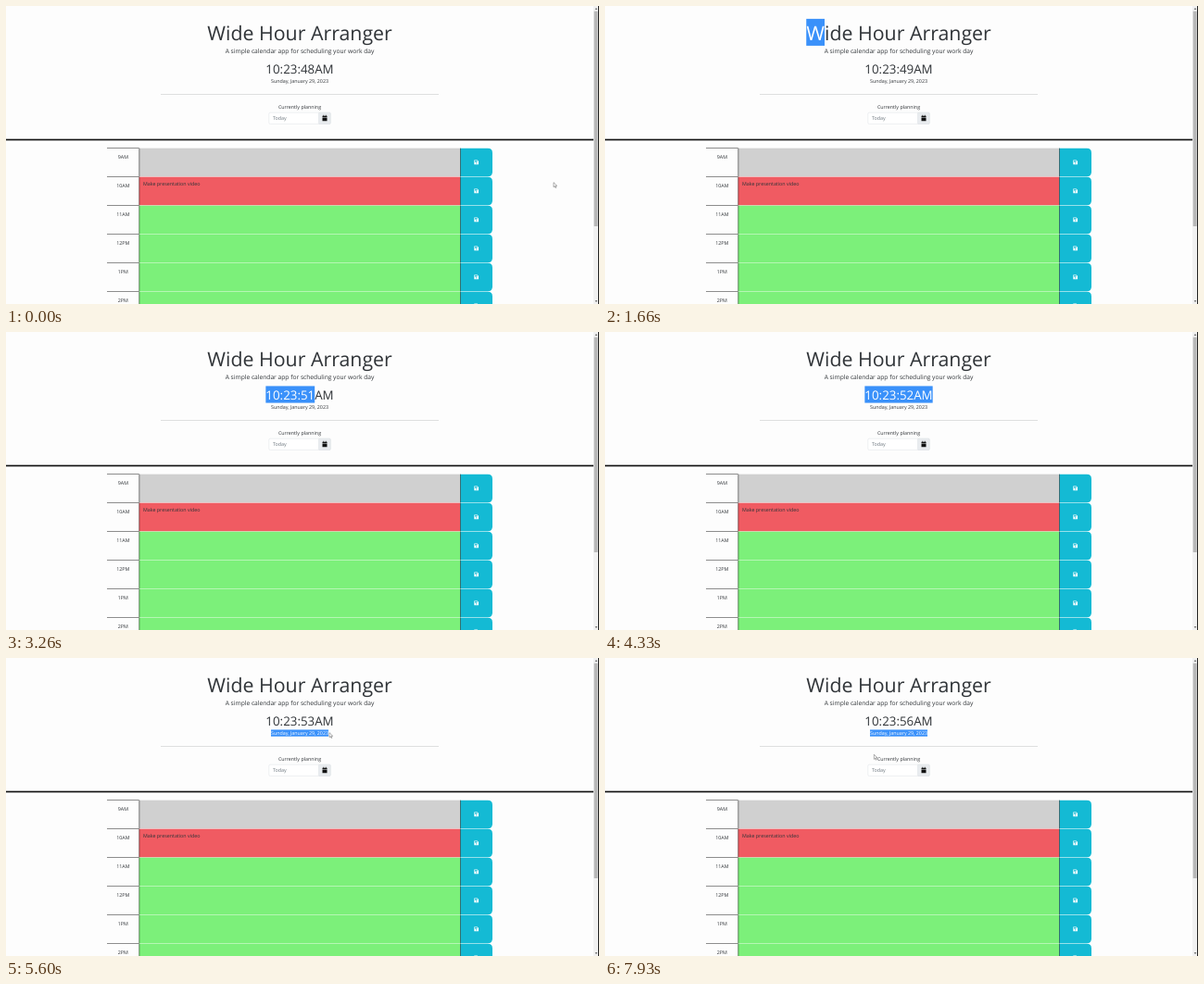
Write an HTML page that moves like this. It is 640x322 px and loops after 8000 ms.

```html
<!DOCTYPE html>
<html lang="en">
<head>
<meta charset="utf-8">
<title>Hour planner</title>
<style>
  html, body { margin: 0; width: 100%; height: 100%; overflow: hidden; background: #fdfdfd; }
  svg { display: block; width: 100%; height: 100%; }
  text { font-family: "Open Sans", "Noto Sans", sans-serif; font-size: 16px; fill: #303438; text-rendering: geometricPrecision; }
  .mid { text-anchor: middle; }
</style>
</head>
<body>
<svg id="stage" viewBox="0 0 1920 966" xmlns="http://www.w3.org/2000/svg"></svg>
<script>
const LOOP = 8000, STEP = 1000 / 15, CENTER = 951;
const svg = document.getElementById('stage');

function el(tag, attrs, parent = svg, content = '') {
  const node = document.createElementNS('http://www.w3.org/2000/svg', tag);
  for (const key in attrs) node.setAttribute(key, attrs[key]);
  node.textContent = content;
  parent.appendChild(node);
  return node;
}
const rect = (x, y, width, height, fill, more) => el('rect', { x, y, width, height, fill, ...more });
const path = (d, fill, more) => el('path', { d, fill, ...more });
const label = (content, x, y, more) => el('text', { x, y, ...more }, svg, content);

// A centred line whose first characters can be highlighted.
function selectable(id, content, y, size) {
  const style = `font-size:${size}px`;
  const base = label(content, CENTER, y, { class: 'mid', style });
  const box = { y: y - 1.069 * size, height: 1.362 * size, width: 0 };
  const mark = el('rect', { ...box, fill: '#3a91fa' });
  const clip = el('rect', box, el('clipPath', { id }));
  const top = label(content, CENTER, y, { class: 'mid', style: style + ';fill:#fff', 'clip-path': `url(#${id})` });
  return {
    write(value) { base.textContent = top.textContent = value; },
    select(part) {
      const length = base.getComputedTextLength();
      const count = base.getNumberOfChars();
      let width = 0;
      for (let n = 1; n <= count && part > 0; n++) {
        const edge = base.getSubStringLength(0, n);
        if (Math.abs(edge - part * length) < Math.abs(width - part * length)) width = edge;
      }
      for (const r of [mark, clip]) {
        r.setAttribute('x', CENTER - length / 2);
        r.setAttribute('width', width);
      }
    }
  };
}

// Header
const title = selectable('titleClip', 'Wide Hour Arranger', 110, 64);
label('A simple calendar app for scheduling your work day', CENTER, 153, { class: 'mid', style: 'font-size:20px' });
const clock = selectable('clockClip', '10:23:48AM', 218, 40);
const date = selectable('dateClip', 'Sunday, January 29, 2023', 249.5, 16);
rect(CENTER - 450, 285.5, 900, 2, '#cfd0d1');
label('Currently planning', CENTER, 332.5, { class: 'mid' });
rect(851.5, 345.5, 199, 37, '#fff', { stroke: '#ced4da', rx: 4 });
rect(1012.5, 345.5, 38, 37, '#e9ecef', { stroke: '#ced4da', rx: 3 });
label('Today', 864, 370, { style: 'fill:#6c757d' });
path('M1024.5 360v-4h3v-3h2v3h5v-3h2v3h3v4zM1024.5 361.5h15v11h-15z', '#111');
rect(0, 431, 1902, 5, '#111');

// Hour rows
const ROW = 93, LEFT = 327, BODY = 431, SAVE = 1471, TEAL = '#14bad4';
['9AM', '10AM', '11AM', '12PM', '1PM', '2PM'].forEach((hour, i) => {
  const y = 460 + i * ROW, mid = y + ROW / 2;
  rect(LEFT, y, BODY - LEFT, 1.8, '#444');
  label(hour, 379, y + 35, { class: 'mid' });
  rect(BODY, y + 1, SAVE - BODY, ROW - 1, ['#d0d0d0', '#f05b62'][i] || '#7cf07a');
  path(`M${SAVE} ${y + 1}h89q15 0 15 15v${ROW - 31}q0 15-15 15h-89z`, TEAL);
  for (const x of [BODY, SAVE]) rect(x, y + 1, 1.5, ROW - 1, '#111');
  path(`M1516 ${mid - 7}h10l4 4v10h-14z`, '#fff');
  rect(1518, mid - 5, 8, 4, TEAL);
  el('circle', { cx: 1523, cy: mid + 3, r: 2, fill: TEAL });
});
label('Make presentation video', 444, 581);

// Scrollbar
rect(1902, 0, 15, 966, '#f1f1f1');
rect(1904, 17, 12, 697, '#b8b8b8');
path('M1907 11l4-5 4 5z', '#555');
path('M1907 955l4 5 4-5z', '#555');
rect(1917, 0, 3, 966, '#222');

const pointer = path('M0 0V15l3.4-3.2 2.6 5.7 2.5-1.1-2.5-5.7h5z', '#fff', { stroke: '#222', 'stroke-width': 1.1 });

// Pointer strokes: time and place of each point; hidden between strokes.
const strokes = [
  [[0, 1773, 572], [130, 1773, 572], [500, 1260, 400], [933, 630, 140], [1000, 606, 128], [1660, 606, 128]],
  [[2730, 1180, 140], [2930, 838, 200]],
  [[4730, 1068, 216], [5000, 852, 238]],
  [[5595, 1047, 242], [6200, 1047, 242], [6800, 1005, 274], [7400, 1005, 274], [7667, 888, 304], [7933, 871, 313], [8000, 871, 313]]
];
// Spans in which the screen stands still.
const holds = [[0, 130], [1000, 1660], [2260, 2460], [2530, 2730], [3530, 3600],
  [3660, 3930], [4330, 4730], [5600, 6260], [6800, 7400], [7660, 7800]];

const ramp = (t, from, to) => Math.min(1, Math.max(0, (t - from) / (to - from)));
const drag = (t, from, to, clear) => t < clear ? ramp(t, from, to) : 0;

function pointerAt(t) {
  const points = strokes.find(s => t >= s[0][0] && t < s[s.length - 1][0]);
  if (!points) return null;
  const i = points.findIndex(p => p[0] > t);
  const [a, b] = [points[i - 1], points[i]];
  const k = ramp(t, a[0], b[0]);
  return [a[1] + (b[1] - a[1]) * k, a[2] + (b[2] - a[2]) * k];
}

function draw(time) {
  const hold = holds.find(([from, to]) => time >= from && time < to);
  const t = Math.floor(((hold ? hold[0] : time) + 7) / STEP) * STEP;
  clock.write(`10:23:${48 + Math.floor((t + 201) / 1000)}AM`);
  title.select(drag(t, 1600, 2260, 2730));
  clock.select(drag(t, 2930, 3400, 4860));
  date.select(drag(t, 5000, 5500, LOOP));
  const spot = pointerAt(t);
  pointer.setAttribute('visibility', spot ? 'visible' : 'hidden');
  if (spot) pointer.setAttribute('transform', `translate(${spot})`);
}

const start = performance.now();
function tick() {
  draw((performance.now() - start) % LOOP);
  requestAnimationFrame(tick);
}
tick();
</script>
</body>
</html>
```
